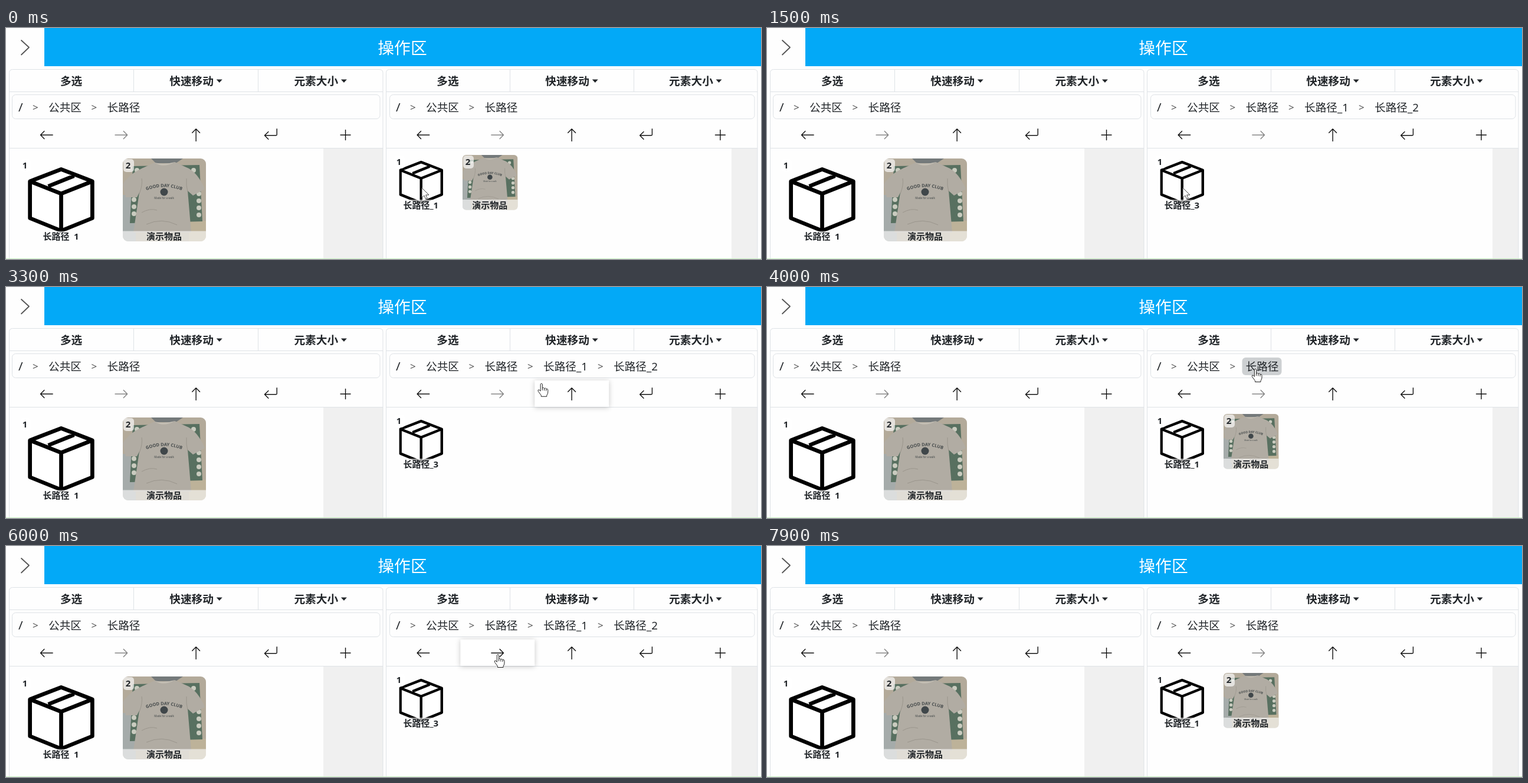
Write an HTML page that moves like this. It is 1280 by 393 pixels and loops after 8000 ms.

```html
<!DOCTYPE html>
<html lang="zh-CN">
<head>
<meta charset="utf-8">
<style>
html, body { margin: 0; width: 100%; height: 100%; overflow: hidden; background: #fefefe; }
svg { display: block; width: 100%; height: 100%; font-family: "Noto Sans", "Noto Sans CJK SC", "Noto Sans CJK", sans-serif; fill: #212529; }
.line { fill: none; stroke: #dee2e6; }
.icon { fill: none; stroke: #111; stroke-width: .88; stroke-linecap: round; stroke-linejoin: round; }
.off { stroke: #858585; }
.bold { font-weight: 700; }
.mid { text-anchor: middle; }
.float { fill: #fff; filter: drop-shadow(0 1px 4px rgba(0,0,0,.22)); }
</style>
</head>
<body>
<svg id="stage" viewBox="0 0 1280 393">
  <defs>
    <symbol id="photo" viewBox="0 0 141 141">
      <clipPath id="round"><rect width="141" height="141" rx="9"/></clipPath>
      <g clip-path="url(#round)">
        <rect width="141" height="141" fill="#b3aa9a"/>
        <path d="M0 62H22V141H0Z" fill="#a5abaa"/>
        <path d="M112 106H141V141H112Z" fill="#bdb299"/>
        <path d="M48 0H102L90 8H56Z" fill="#74797a"/>
        <path d="M17 13 130 11 135 107 12 110Z" fill="#587060"/>
        <path d="M24 20H124M19 70V106M129 60V105" fill="none" stroke="#c9cbbf" stroke-width="8" stroke-linecap="round" stroke-dasharray="0 12"/>
        <path d="M54 7Q70 17 88 6L112 17Q128 26 139 52L119 63 110 55 116 126H18L28 58 24 66 5 66 0 44Q10 27 32 17Z" fill="#b1aca3"/>
        <path d="M54 7Q70 17 88 6Q72 11 54 7Z" fill="#c3beb4"/>
        <path d="M28 60Q34 45 32 34M110 57Q107 45 108 34M40 112Q66 100 92 113M32 92Q46 84 58 88" fill="none" stroke="#9a958c"/>
        <path id="arc" d="M30 59Q70 38 110 59" fill="none"/>
        <text class="bold mid" font-size="7.500" fill="#454a4b"><textPath href="#arc" startOffset="50%">GOOD DAY CLUB</textPath></text>
        <circle cx="70" cy="57" r="6.500" fill="#40474a"/>
        <text class="mid" x="70" y="69" font-size="4.500" fill="#454a4b">Made for a walk</text>
      </g>
    </symbol>
    <symbol id="box" viewBox="0 0 16 16">
      <path d="M8 .6 .5 3.5V12.4L8 15.45 15.5 12.4V3.5ZM.5 3.5 8 6.5 15.5 3.5M8 6.5V15.4M11.1 2.2 4.9 4.7" fill="#fff" stroke="#000" stroke-width=".95" stroke-linejoin="round"/>
    </symbol>
    <path id="arrow" d="M0 0V16.5L4 13 6.6 19 9.3 17.8 6.7 12H12Z" fill="#fff" stroke="#444"/>
    <path id="hand" d="M-1.6 1.5Q0-1 1.6 1.5V8Q4 6.7 4.8 8.7 7 7.5 8 9.5 10.8 8.8 11 11.5V15Q11 18 9 20.5V22.5H-.5V20.5L-5.6 13.5Q-6.5 10.8-4 11L-1.6 13.3ZM1.6 8V12M4.8 9V12.5M8 10V13" fill="#fff" stroke="#222" stroke-linejoin="round"/>
  </defs>
  <path d="M65 0H1280V65H65Z" fill="#03a9f7"/>
  <path d="M26 21 39 33 26 45.500" fill="none" stroke="#555" stroke-width="1.800" stroke-linecap="round" stroke-linejoin="round"/>
  <text class="mid" x="672" y="44" font-size="27.800" fill="#fff">操作区</text>
  <g id="left"></g>
  <g id="right"></g>
  <path d="M0 392.500H1280" stroke="#c9f5c2"/>
  <use id="pointer"/>
</svg>
<script>
const LOOP = 8000;
const ROOT = "长路径";
// [time, folder depth]
const VISITS = [[0, 0], [300, 1], [1000, 2], [1600, 3], [2700, 2], [3850, 0], [4700, 2], [6100, 0]];
// [time, x, y] of the pointer tip
const TRACK = [[0, 705, 272], [1750, 705, 272], [2300, 960, 180], [3000, 960, 180], [3700, 828, 139],
  [4050, 828, 139], [4500, 710, 184], [5400, 710, 184], [6000, 834, 184], [6650, 834, 184], [7080, 871, -26]];
const ICONS = [
  "M14.5 8H1.7M5.6 4 1.6 8 5.6 12",
  "M1.5 8H14.3M10.4 4 14.4 8 10.4 12",
  "M8 14.500V1.700M4 5.600 8 1.600 12 5.600",
  "M14.500 1.500V7.500a1 1 0 0 1-1 1H1.700M5.500 4.500 1.500 8.500 5.500 12.500",
  "M8 2.700V13.300M2.700 8H13.300"
];
const LEFT = { x: 5.5, width: 633.5, crumbX: 10.5, gray: 538, tileX: 23, tileY: 222, size: 141, gap: 175 };
const RIGHT = { x: 644.5, width: 629.5, crumbX: 650.5, gray: 1230, tileX: 657, tileY: 216, size: 93.5, gap: 117 };
const $ = id => document.getElementById(id);

const text = (x, y, size, content, attrs = "") => `<text x="${x}" y="${y}" font-size="${size}" ${attrs}>${content}</text>`;
const rect = (x, y, w, h, attrs) => `<rect x="${x}" y="${y}" width="${w}" height="${h}" ${attrs}/>`;
const inside = (p, x, y, w, h) => p && p.x >= x && p.x < x + w && p.y >= y && p.y < y + h;

function tabs({ x, width }) {
  const w = width / 3;
  return ["多选", "快速移动", "元素大小"].map((name, i) => {
    const cx = x + w * (i + .5);
    if (!i) return text(cx - .5, 97, 18.7, name, 'class="bold mid"');
    return text(cx - 45, 97, 18.7, name, 'class="bold"') +
      `<path d="M${cx + 34.5} 87.500h10l-5 5.500Z"/><path class="line" d="M${Math.floor(x + w * i) + .5} 70V109"/>`;
  }).join("");
}

function crumbs({ crumbX, x, width }, depth, pointer, pressed) {
  let out = rect(crumbX, 113.5, x + width - 5 - crumbX, 41, 'rx="6" class="line"') + text(crumbX + 10.5, 142, 20.5, "/");
  let left = crumbX + 61.5;
  const names = ["公共区", ROOT];
  for (let i = 1; i <= depth; i++) names.push(`${ROOT}_${i}`);
  names.forEach((name, i) => {
    const w = i > 1 ? 75.5 : 56;
    if (inside(pointer, left - 6, 120, w + 11, 30))
      out += rect(left - 6, 120, w + 11, 30, `rx="6" fill="${pressed ? "#cdd0d2" : "#ebeced"}"`);
    out += text(left - 27, 140.5, 17, "&gt;", 'fill="#555"') + text(left, 141.5, 18.7, name);
    left += w + 43.5;
  });
  return out;
}

function toolbar({ x, width }, canForward, pointer) {
  const w = width / 5;
  return ICONS.map((d, i) => {
    const left = x + w * i;
    const hover = inside(pointer, left, 159, w, 46) ? rect(left, 159, w, 45, 'class="float"') : "";
    const off = i == 1 && !canForward ? "off" : "";
    return hover + `<path class="icon ${off}" d="${d}" transform="translate(${left + w / 2 - 12.9} 169.200) scale(1.6)"/>`;
  }).join("");
}

function tile({ tileX, tileY, size, gap }, index, symbol, label) {
  const x = tileX + gap * index;
  const inset = symbol == "box" ? size * .1 : 0;
  const side = size - inset * 2;
  return `<use href="#${symbol}" x="${x + inset}" y="${tileY + inset}" width="${side}" height="${side}"/>` +
    rect(x + 1, tileY + 1, 18, 22, 'rx="5" fill="#fff" fill-opacity=".65"') +
    text(x + 9, tileY + 17, 15, index + 1, 'class="bold mid"') +
    rect(x, tileY + size - 17.5, size, 17.5, 'fill="#fff" fill-opacity=".6"') +
    text(x + size / 2 - .5, tileY + size - 3, 15, label, 'class="bold mid"');
}

function panel(p, depth, canForward, pointer, pressed, separator = "_") {
  const right = p.x + p.width;
  let out = `<path d="M${p.gray} 205H${right}V393H${p.gray}Z" fill="#f0f0f0"/>` +
    `<path class="line" d="M${p.x} 393V76.500q0-6 6-6H${right - 6}q6 0 6 6V393M${p.x} 108.500H${right}M${p.x} 204.500H${right}"/>` +
    tabs(p) + crumbs(p, depth, pointer, pressed);
  if (depth < 3) out += tile(p, 0, "box", ROOT + separator + (depth + 1));
  if (!depth) out += tile(p, 1, "photo", "演示物品");
  return out + toolbar(p, canForward, pointer);
}

function pointerAt(t) {
  const i = TRACK.findIndex(k => k[0] > t);
  if (i < 0) return { x: 871, y: -26 };
  const [t0, x0, y0] = TRACK[i - 1], [t1, x1, y1] = TRACK[i];
  const u = (t - t0) / (t1 - t0), s = u * u * (3 - 2 * u);
  return { x: x0 + (x1 - x0) * s, y: y0 + (y1 - y0) * s };
}

let shown = "";
function draw(now) {
  const t = now % LOOP;
  const pointer = pointerAt(t);
  const depth = VISITS.filter(v => v[0] <= t).pop()[1];
  const html = panel(RIGHT, depth, t >= 4700 && t < 6100, pointer, t >= 3850 && t < 4300);
  if (html != shown) $("right").innerHTML = shown = html;
  const clickable = pointer.y > 70 && pointer.y < 205;
  $("pointer").setAttribute("href", clickable ? "#hand" : "#arrow");
  $("pointer").setAttribute("transform", `translate(${pointer.x} ${pointer.y})`);
  requestAnimationFrame(draw);
}

// The wide tile shows a gap in place of the underscore.
$("left").innerHTML = panel(LEFT, 0, false, null, false, "\u2002");
requestAnimationFrame(draw);
</script>
</body>
</html>
```
